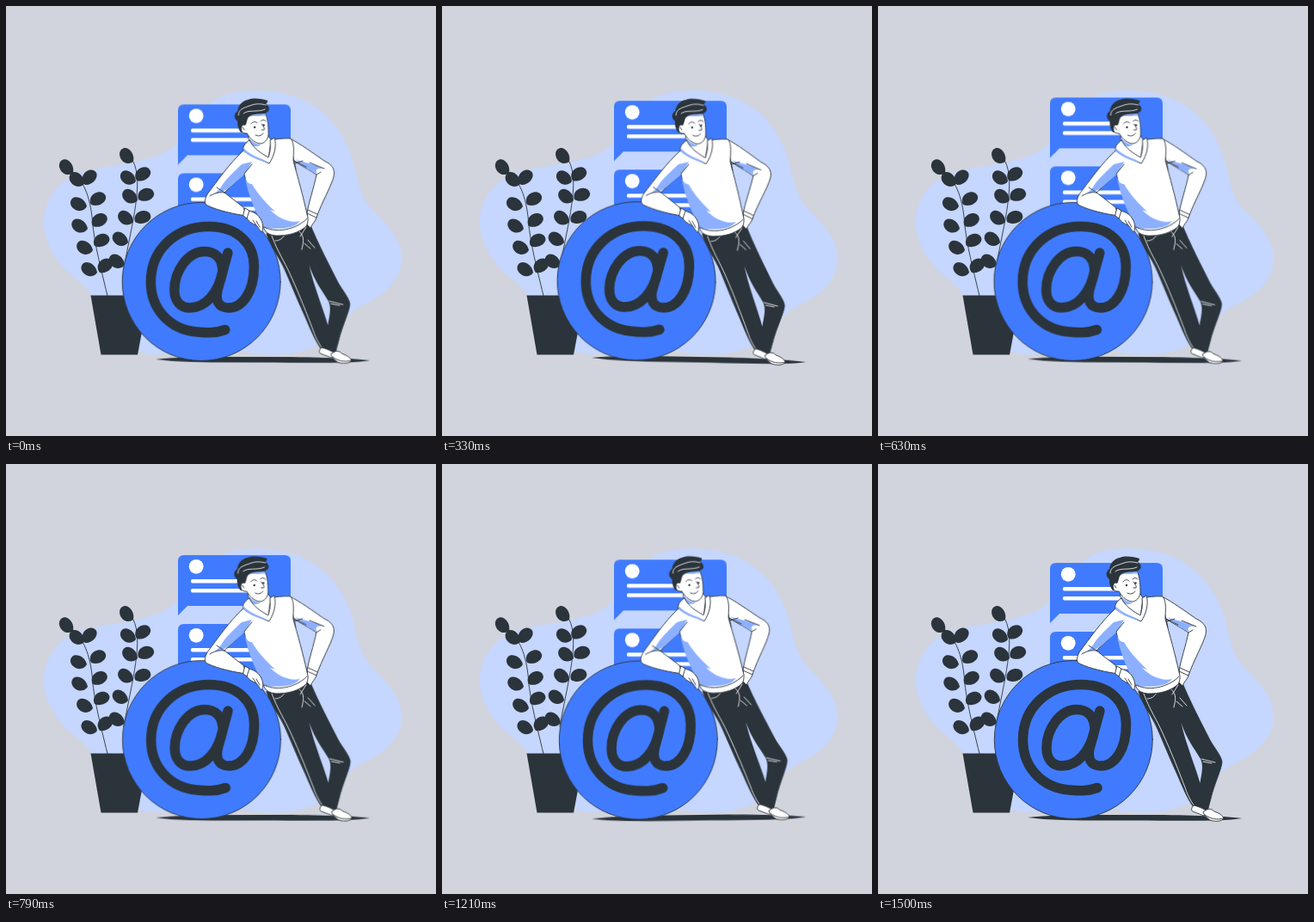
An HTML page that plays this animation: 500x500 px, repeating every 1540 ms.

```html
<!DOCTYPE html>
<html lang="en">
<head>
<meta charset="utf-8">
<title>At-sign illustration</title>
<style>
  html, body { margin: 0; width: 100%; height: 100%; overflow: hidden; background: #d1d4dd; }
  svg { display: block; width: 100%; height: 100%; }
  .dark { fill: #2b343b; }
  .blue { fill: #407bff; }
  .pale { fill: #c5d6ff; }
  .white { fill: #fff; }
  .shade { fill: #8cb0ff; }
  .ink { stroke: #2b343b; stroke-width: .9; stroke-linejoin: round; stroke-linecap: round; }
  .line { fill: none; }
  .seam { fill: none; stroke: #fff; stroke-width: .8; stroke-linecap: round; }
  .sign { fill: none; stroke: #2b343b; stroke-width: 11.5; stroke-linecap: round; stroke-linejoin: round; }
  .bar { fill: none; stroke: #fff; stroke-width: 4.4; stroke-linecap: round; }
  .sway { transform-box: view-box; }
  #lean { transform-origin: 272px 247px; }
  #ground { transform-origin: 299px 411.5px; }
</style>
</head>
<body>
<svg viewBox="0 0 500 500">
  <defs>
    <path id="leaf" d="M0 0C1-7 8-10 14-7.500C19-5.500 21-1 19 3C16 8 5 8 0 0Z"/>
    <g id="card">
      <path class="blue" d="M207 115H324Q331 115 331 122V167Q331 174 324 174H211L200 185V122Q200 115 207 115Z"/>
      <circle class="white" cx="221.200" cy="128.300" r="8.400"/>
      <path class="bar" d="M217 145.300H290M217 156.200H290"/>
    </g>
  </defs>

  <path class="pale" d="M43.500 254C43 236 52 212 73 200C99 186 139 187 174 175C214 161 214 124 247 107C272 94 319 96 347 110C376 124 394 149 403 180C410 205 411 221 428 239C447 257 460 274 460 294C459 322 438 337 415 348C391 359 387 382 363 394C338 407 306 408 278 402C246 395 210 405 176 405C143 405 122 381 111 358C100 333 91 324 76 313C58 299 45 273 43.500 254Z"/>

  <g id="cards">
    <use href="#card"/>
    <use href="#card" y="80"/>
  </g>

  <g id="plant" class="dark">
    <path d="M98.500 336.500H166L153 405.500H110.500Z"/>
    <path class="ink line" d="M118 337C109 300 104 280 101 256C99 225 92 206 78 193M148 181C160 205 147 250 137 305"/>
  </g>

  <path id="ground" class="dark sway" d="M174 411C205 407 262 408 305 408C355 408 399 409 423.500 412C397 416 346 414.500 298 414.500C246 414.500 202 415 174 411Z"/>

  <g id="lean" class="sway">
    <circle class="blue ink" cx="227.300" cy="320.500" r="92"/>
    <path class="sign" d="M255 376.500C243 381 232 380 222 379C189 376 168.500 351 168.500 321C168.500 283 198 256.500 236 256.500C269 256.500 288.500 276 288.500 303C288.500 331 276 351 259 351C247 351 243 342 246.500 329L258 287M252 309C252 293 243 285.500 231 285.500C211 285.500 196 309 196 330C196 343 203 351 214 351C232 351 247 334 252 309Z"/>

    <!-- trousers -->
    <path class="dark ink" d="M303 265C309 282 319 294 325 308C334 329 341 346 348 361C356 380 361 391 367 399L383 404L387 389C391 372 400 354 400 346C399 339 391 330 386 321C377 303 363 277 352 250Z"/>
    <path class="pale" d="M352.500 301C359 320 368 331 375 343C379 351 376 361 374.500 371C369 351 358 326 352.500 301Z"/>
    <path class="seam" d="M309 267C316 286 324 297 331 313C342 337 350 358 357 376C361 388 366 396 370 400M313 273C318 273 322 270 324 266M341 262C346 267 347 271 344 283M349 257L342 268M347 276L354 282M351 272L359 281M376 343L392 347M378 346L388 348"/>

    <!-- shoes -->
    <path class="white ink" d="M367 397C364 400 364 403 366 404L379 409L385 405C377 400 372 398 367 397Z"/>
    <path class="white ink" d="M382 402C386 400 389 402 391 404C397 406 401 409 402 412C400 416 391 416 386 414C382 411 379 408 378 405Z"/>
    <path class="ink line" d="M380 408C387 413 394 414 402 412"/>

    <!-- far hand and arm -->
    <path class="white ink" d="M351 240L361 245C361 249 356 253 354 258L350 254Z"/>
    <path class="white ink" d="M330 154C342 160 357 171 370 180C379 184 383 190 381 198C378 210 367 228 361 246L350 241C352 228 358 211 361 196C354 191 345 187 335 180Z"/>
    <path class="shade" d="M336 178C346 182 357 183 369 189C364 188 358 189 362 195L351 190Z"/>
    <path class="ink line" d="M335 180L349 187M336 183L345 180M353 182L370 189M361 196L366 193M351 237L362 242"/>

    <!-- near upper arm and sweater -->
    <path class="white ink" d="M276 168C290 158 315 153 331 154C336 160 334 172 334 180C339 198 346 223 350 242C352 247 351 253 349 256C341 264 327 267 316 267C309 267 303 265 300 259C294 241 282 221 277 195L254 217L276 234L280 244C265 242 247 238 234 232C230 229 231 225 234 219C246 203 259 184 276 168Z"/>
    <path class="shade" d="M277 195C281 222 293 244 300 258C318 260 335 259 342 250C329 253 316 246 307 237L313 239C300 227 291 216 286 207C280 207 278 201 277 195Z"/>
    <path class="shade" d="M274 184C265 193 256 200 249 212C245 217 240 220 235 220C246 217 253 217 260 211L277 196C281 190 284 185 286 181Z"/>
    <path class="ink line" d="M277 195L286 184M254 217C247 216 242 218 237 221M254 217L245 211M300 257C318 266 341 257 350 247M335 180L337 190"/>

    <!-- resting hand -->
    <path class="white ink" d="M281 238C288 239 292 242 295 246C299 251 300 259 297 263C295 261 294 258 291 255C286 253 281 250 279 245Z"/>
    <path class="white ink" d="M278 235L283 238L280 247L276 244Z"/>
    <path class="ink line" d="M291 255L287 249M295 257L291 250"/>

    <!-- neck and hood -->
    <path class="white ink" d="M281 146L283 162L305 178L308 156L303 147Z"/>
    <path class="shade" d="M282 153C286 158 291 161 296 161C293 164 288 164 283 161Z"/>
    <path class="white ink" d="M283 156C277 160 274 165 277 169C286 175 296 179 306 183C312 174 315 162 312 153L307 156C308 164 307 170 305 176C296 171 287 165 283 156Z"/>
    <path class="shade" d="M277 166C283 172 292 176 300 179L305 182C293 180 283 175 276 169Z"/>

    <!-- head -->
    <path class="white ink" d="M276 127L301 124C305 132 305 143 305 150C304 156 300 160 295 160C288 159 283 153 280 148C273 149 270 142 274 137Z"/>
    <path class="shade" d="M280 133C281 127 287 128 291 128C297 128 300 127 302 128L301 125L280 126Z"/>
    <path class="dark" d="M273 147C269 142 269 137 269 134C265 131 264 126 269 122C270 115 275 110 281 109C288 106 298 108 304 110C304 112 303 113 302 114C306 116 307 121 304 123C299 127 292 124 285 127C279 129 281 135 278 139C275 137 272 141 275 147Z"/>
    <path class="seam" d="M270 127C270 119 278 118 286 115C292 113 298 114 302 115M276 125C281 120 293 124 301 120"/>
    <path class="ink line" d="M285 137C287 134 290 134 292 136M296 134C298 132 300 132 302 134M297 137C299 140 301 142 300 144L297 144M290 150C293 152 297 151 299 148M275 141L277 144"/>
    <circle class="dark" cx="289" cy="141" r="1.200"/>
    <circle class="dark" cx="299.500" cy="138.500" r="1.200"/>
  </g>
</svg>
<script>
  const $ = id => document.getElementById(id);
  const NS = "http://www.w3.org/2000/svg";

  // base x, base y, direction in degrees
  const leaves = [
    [78, 194, 225], [91, 207, 216], [92, 208, -56], [94, 233, 200], [99, 231, -36],
    [95, 259, 204], [101, 256, -38], [101, 284, 202], [103, 279, -34],
    [106, 310, 206], [109, 310, -48],
    [148, 181, 226], [151, 204, 210], [152, 203, -42], [153, 226, 212], [154, 225, -28],
    [148, 251, 212], [150, 251, -26], [142, 275, 208], [138, 301, 208]
  ];
  for (const [x, y, a] of leaves) {
    const leaf = document.createElementNS(NS, "use");
    leaf.setAttribute("href", "#leaf");
    leaf.setAttribute("transform", `translate(${x} ${y}) rotate(${a})`);
    $("plant").append(leaf);
  }

  const loop = { duration: 1540, delay: -40, iterations: Infinity, easing: "linear" };
  const turn = (deg, offset) => ({ transform: `rotate(${deg}deg)`, offset });
  const lift = (y, offset) => ({ transform: `translateY(${y}px)`, offset });

  const sway = [turn(0, 0), turn(1, .25), turn(-1, .75), turn(0, 1)];
  const bob = [lift(0, 0), lift(-9.8, .5), lift(0, 1)];

  const moves = [
    $("lean").animate(sway, loop),
    $("ground").animate(sway, loop),
    $("cards").animate(bob, loop)
  ];
  for (const m of moves) m.startTime = document.timeline.currentTime;
</script>
</body>
</html>
```
